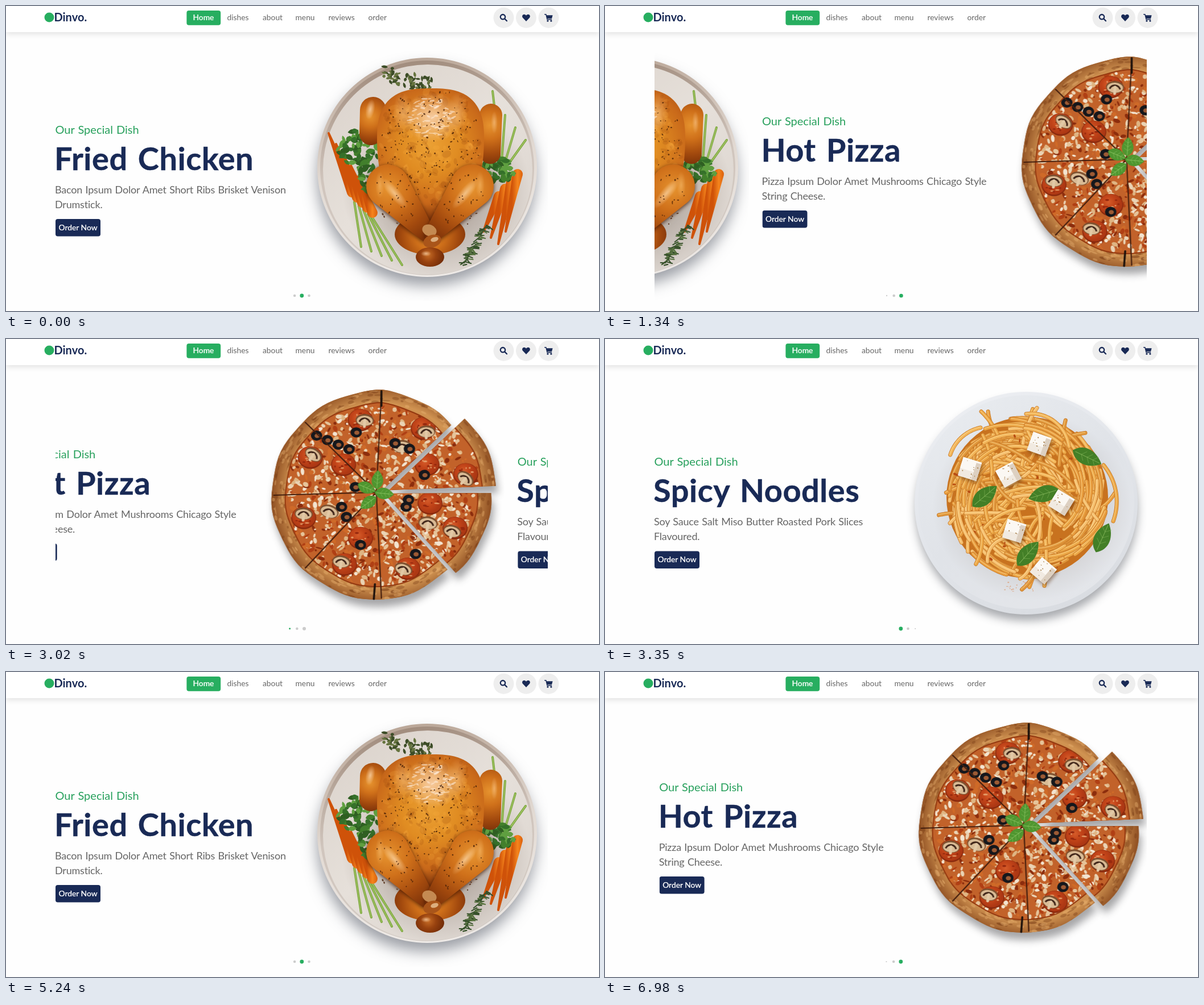
An HTML page with a canvas for the animation above (7050 ms loop, 1042 px wide and 537 px high).

```html
<!DOCTYPE html>
<html lang="en">
<head>
<meta charset="utf-8">
<title>Special dishes</title>
<style>
html, body { margin: 0; width: 100%; height: 100%; overflow: hidden; background: #fefefe; }
#stage { position: relative; width: 1042px; height: 537px; overflow: hidden; }
#stage svg, canvas { position: absolute; left: 0; top: 0; display: block; }
text { font-family: Lato, "Open Sans", sans-serif; font-size: 13.8px; white-space: pre; }
header { position: absolute; left: 0; top: 0; width: 1042px; height: 46px; background: #fff; box-shadow: 0 4px 9px rgba(0,0,0,.1); }
.nav { fill: #666; }
.brand { font-size: 20px; font-weight: 700; fill: #192a56; }
.light { fill: #fff; font-weight: 500; stroke: #fff; stroke-width: .2px; }
#view { position: absolute; left: 87px; top: 80px; width: 865px; height: 440px; overflow: hidden; }
.slide { position: absolute; left: 0; top: 0; width: 865px; height: 440px; }
.sub { font-size: 20px; word-spacing: 1px; fill: #27a05c; }
.title { font-size: 56px; font-weight: 700; letter-spacing: .5px; word-spacing: 4px; fill: #192a56; stroke: #192a56; stroke-width: .4px; stroke-linejoin: round; }
.body { font-size: 18px; letter-spacing: -.2px; word-spacing: 1px; fill: #666; }
</style>
</head>
<body>
<div id="stage">
  <div id="view"></div>
  <header>
    <svg width="1042" height="46">
      <circle cx="76" cy="20" r="8.5" fill="#27ae60"/>
      <text class="brand" x="84.5" y="27">Dinvo.</text>
      <rect x="317.4" y="8" width="59.8" height="25.8" rx="4" fill="#27ae60"/>
      <text class="light" x="328.5" y="25">Home</text>
      <g class="nav">
        <text x="388.5" y="25">dishes</text>
        <text x="451" y="25">about</text>
        <text x="508.5" y="25">menu</text>
        <text x="566.5" y="25">reviews</text>
        <text x="636.5" y="25">order</text>
      </g>
      <g fill="#eee">
        <circle cx="874.5" cy="20.7" r="18"/><circle cx="914" cy="20.7" r="18"/><circle cx="953.5" cy="20.7" r="18"/>
      </g>
      <g fill="none" stroke="#192a56" stroke-width="2.3" stroke-linecap="round">
        <circle cx="873" cy="19.2" r="4.2"/><path d="M876.4 22.6L880 26.2"/>
      </g>
      <g fill="#192a56">
        <path d="M914 27L908.3 21.1C905.6 17.6 908 14.5 910.6 14.7C912.3 14.8 913.3 15.8 914 16.8C914.7 15.8 915.7 14.8 917.4 14.7C920 14.5 922.4 17.6 919.7 21.1Z"/>
        <path d="M949.2 16.2H960.6L959 22.2H950.6Z"/>
        <circle cx="951.9" cy="26.2" r="1.5"/><circle cx="957.9" cy="26.2" r="1.5"/>
      </g>
      <path d="M946.6 14.8H948.9L951 23.8H958.6" fill="none" stroke="#192a56" stroke-width="1.4" stroke-linecap="round"/>
    </svg>
  </header>
  <svg width="1042" height="537"><g id="dots"></g></svg>
</div>
<script>
const { PI, cos, sin, abs, sign, sqrt } = Math, TAU = PI * 2;
let g, seed;

function rnd(a = 0, b = 1) {
  seed = (seed + 0x6D2B79F5) | 0;
  let v = Math.imul(seed ^ seed >>> 15, 1 | seed);
  v = v + Math.imul(v ^ v >>> 7, 61 | v) ^ v;
  return a + (b - a) * ((v ^ v >>> 14) >>> 0) / 4294967296;
}
function repeat(n, draw) { for (let i = 0; i < n; i++) draw(i); }

// Random point in an ellipse, or in its outer ring
function scatter(x, y, rx, ry, inner = 0) {
  const a = rnd(0, TAU), r = sqrt(rnd(inner * inner, 1));
  return [x + cos(a) * r * rx, y + sin(a) * r * ry];
}
function oval(x, y, rx, ry, fill, turn = 0) {
  g.beginPath(); g.ellipse(x, y, rx, ry, turn, 0, TAU);
  g.fillStyle = fill; g.fill();
}
function line(points, color, w) {
  g.beginPath();
  points.forEach(p => g.lineTo(...p));
  g.strokeStyle = color; g.lineWidth = w; g.lineCap = g.lineJoin = "round"; g.stroke();
}
// Outline from a function of the angle
function outline(at) {
  g.beginPath();
  for (let a = 0; a < TAU; a += .04) g.lineTo(...at(a));
  g.closePath();
}
// Hull of two circles
function taper(x1, y1, r1, x2, y2, r2, fill) {
  const a = Math.atan2(y2 - y1, x2 - x1), b = Math.acos((r1 - r2) / Math.hypot(x2 - x1, y2 - y1));
  g.beginPath();
  g.arc(x1, y1, r1, a + b, a - b + TAU);
  g.arc(x2, y2, r2, a - b, a + b);
  g.fillStyle = fill; g.fill();
}
function stops(f, colors) {
  colors.forEach((c, i) => f.addColorStop(i / (colors.length - 1), c));
  return f;
}
const radial = (x, y, r, ...colors) => stops(g.createRadialGradient(x, y, 0, x, y, r), colors);
const linear = (x1, y1, x2, y2, ...colors) => stops(g.createLinearGradient(x1, y1, x2, y2), colors);

function glow(x, y, rx, ry, rgb, alpha, turn = 0) {
  placed(x, y, turn, () => {
    g.scale(rx, ry);
    oval(0, 0, 1, 1, radial(0, 0, 1, `rgba(${rgb},${alpha})`, `rgba(${rgb},0)`));
  });
}
function placed(x, y, turn, draw) {
  g.save(); g.translate(x, y); g.rotate(turn); draw(); g.restore();
}
function shaded(dx, dy, blur, color, draw) {
  g.save();
  g.shadowOffsetX = dx; g.shadowOffsetY = dy; g.shadowBlur = blur; g.shadowColor = color;
  draw();
  g.restore();
}
function leaf(x, y, len, wid, turn, color, rib) {
  placed(x, y, turn, () => {
    g.beginPath(); g.moveTo(-len, 0);
    g.bezierCurveTo(-len * .5, -wid * 1.5, len * .4, -wid * 1.2, len, 0);
    g.bezierCurveTo(len * .4, wid * 1.2, -len * .5, wid * 1.5, -len, 0);
    g.fillStyle = color; g.fill();
    if (!rib) return;
    line([[-len * .8, 0], [len * .85, 0]], rib, 1);
    for (const s of [-.4, 0, .4])
      for (const d of [-1, 1]) line([[len * s, 0], [len * (s + .25), d * wid * .6]], rib, .6);
  });
}
function parsley(x, y, rx, ry, n) {
  repeat(n, i => leaf(...scatter(x, y, rx, ry), rnd(5, 9), rnd(2.5, 5), rnd(0, TAU),
    ["#2f5f22", "#427f2c", "#5f9f40", "#35702a"][i % 4]));
}

function chicken() {
  const mid = 745;
  shaded(-1, 16, 26, "rgba(55,62,75,.5)", () => oval(740, 284, 192, 192, "#ddd"));
  oval(740, 284, 193, 193, linear(690, 91, 760, 477, "#b9a596", "#e2dad3", "#efebe8"));
  oval(740, 285, 188, 189, linear(690, 95, 750, 470, "#a08b7c", "#d0c5bd", "#d4ccc5"));
  oval(741, 288, 184, 185, linear(600, 130, 850, 450, "#dcd4cd", "#e6e0da", "#dcd5cf"));
  glow(755, 320, 165, 155, "80,62,50", .55);

  // Herbs and vegetables
  repeat(75, () => {
    const u = rnd();
    leaf(664 + u * 86, 118 + u * 24 + rnd(-13, 13), rnd(3, 6), rnd(1.5, 2.8), rnd(0, TAU), rnd() < .7 ? "#3d4d27" : "#66743f");
  });
  const stem = (...p) => { line(p, "#7aa63c", 4); line(p, "#a9c96a", 1.3); };
  repeat(5, i => stem([612 + i * 8, 345 + i * 7], [624 + i * 18, 424 + i * 8]));
  repeat(3, i => stem([870 + i * 4, 285], [877 + i * 18, 192 + i * 22]));
  stem([855, 150], [859, 184]);
  const carrot = (x1, y1, x2, y2) =>
    taper(x1, y1, 9, x2, y2, 2, linear(x1 - 10, y1, x1 + 10, y1, "#cf5209", "#f5851d", "#d95c0b"));
  repeat(5, i => carrot(608 + i * 9, 328 + i * 9, 567 + i * 13, 224 + i * 19));
  repeat(4, i => carrot(866 + i * 11, 335 - i * 13, 839 + i * 13, 397 + i % 3 * 11));
  parsley(622, 250, 38, 32, 65);
  parsley(634, 295, 15, 32, 25);
  parsley(866, 288, 28, 24, 45);
  repeat(70, i => {
    const u = rnd(), x = 845 - u * 42, y = 385 + u * 72;
    line([[x, y], [x + (i % 2 ? 1 : -1) * rnd(4, 11), y + rnd(-2, 9)]], i % 3 ? "#37512b" : "#58733f", 2);
  });

  const skin = (x, y, r) => radial(x, y, r, "#e6932f", "#cf701a", "#a34a0e", "#742d08");
  const fleck = (x, y) => oval(x, y, rnd(.7, 2.2), rnd(.6, 1.5), "rgba(70,30,6,.8)", rnd(0, 3));
  taper(645, 183, 23, 641, 225, 20, skin(640, 195, 55));
  taper(852, 192, 20, 851, 260, 18, skin(850, 210, 75));
  glow(640, 182, 8, 18, "255,226,190", .7, .2);
  glow(858, 205, 6, 20, "255,210,160", .5);
  oval(mid, 402, 62, 36, skin(mid, 405, 75));

  g.save();
  outline(a => [
    746 + 94 * sign(cos(a)) * abs(cos(a)) ** .72,
    235 + (sin(a) < 0 ? -90 : 150) * abs(sin(a)) ** (sin(a) < 0 ? .75 : 1)
  ]);
  g.fillStyle = radial(mid, 245, 150, "#eba033", "#e08c22", "#c9691a", "#8a390b");
  g.fill(); g.clip();
  repeat(260, i => oval(...scatter(mid, 260, 95, 125), rnd(2, 9), rnd(2, 6),
    i % 2 ? "rgba(250,180,70,.16)" : "rgba(140,55,8,.16)", rnd(0, 3)));
  glow(748, 196, 52, 44, "250,214,182", .85);
  for (const d of [-1, 1]) glow(mid + d * 48, 188, 17, 36, "255,205,140", .5);
  glow(mid, 385, 60, 36, "105,38,6", .7);
  repeat(90, () => oval(...scatter(747, 197, 42, 36), rnd(2, 6), rnd(.6, 1.6), "rgba(255,238,222,.55)", rnd(-.5, .5)));
  repeat(190, () => fleck(...scatter(mid, 250, 92, 110)));
  g.restore();

  // Legs, mirrored about the middle
  for (const d of [-1, 1]) {
    const x = mid + d * 74;
    shaded(0, 2, 7, "rgba(60,20,0,.8)", () => taper(x, 317, 38, mid + d * 6, 400, 15, skin(x, 322, 115)));
    glow(x - d * 12, 330, 10, 34, "255,225,185", .65, d * .7);
    glow(x + d * 14, 315, 8, 24, "255,205,130", .45);
    repeat(34, () => fleck(x - d * rnd(-14, 46) + rnd(-10, 10), rnd(295, 385)));
  }
  oval(744, 395, 13, 10, "#c48a52", .4);
  oval(749, 414, 16, 11, "#a9551a", -.3);
  oval(753, 411, 7, 4, "#dcae7e", -.3);
  oval(mid, 442, 25, 17, radial(742, 438, 27, "#c76d26", "#98420f", "#742d08"));
  glow(738, 436, 9, 5, "255,220,180", .7);
}

// Point of the pizza at an angle and a share of the radius
const at = (a, r) => [736 + 193 * r * cos(a), 275 + 185 * r * sin(a)];
const deg = d => d * PI / 180;

// Slice outline; pull shortens the radius toward the right
function wedge(a0, a1, k, pull) {
  g.beginPath();
  g.moveTo(736 + 5 * cos((a0 + a1) / 2), 272);
  for (let i = 0; i <= 80; i++) {
    const a = a0 + (a1 - a0) * i / 80;
    g.lineTo(...at(a, k * (1 - pull * Math.max(0, cos(a)) + .006 * sin(a * 11))));
  }
  g.closePath();
}
function topping() {
  const spots = ["#ead3b4", "#dfb583", "#b03f14", "#f3e4d0", "#cf6a28", "#8c2d0d", "#e6c49a"];
  repeat(1300, i => oval(...scatter(736, 275, 166, 159), rnd(1.5, 6.5), rnd(1.2, 4), spots[i % 7], rnd(0, 3)));
  const pepperoni = (x, y, r) => {
    oval(x, y, r, r * .9, "#8a2a0e");
    oval(x, y - 1, r - 1.5, r * .9 - 1.5, radial(x - 4, y - 5, r, "#d65c2a", "#c24419", "#ad3814"));
    repeat(12, i => oval(...scatter(x, y, r * .7, r * .6), rnd(1, 4), rnd(1, 2), i % 2 ? "#e39a66" : "#97290e"));
  };
  const mushroom = (x, y, r) => placed(x, y, rnd(-.7, .7), () => {
    oval(0, 0, r, r * .68, "#7d5130");
    oval(0, 1, r - 2, r * .68 - 2, "#d9bb95");
    g.beginPath(); g.arc(0, r * .4, r * .6, PI * 1.1, PI * 1.9);
    g.strokeStyle = "#40261a"; g.lineWidth = 3; g.stroke();
    line([[0, 0], [0, r * .7]], "#e2c9a6", 5);
  });
  const olive = (x, y) => {
    oval(x, y, 10, 9, "#15171c");
    oval(x + 1, y + .5, 4.5, 3.8, "#9c5a34");
  };
  repeat(4, i => pepperoni(...at(deg(10 + i * 105), .45), 22));
  repeat(8, i => pepperoni(...at(deg(25 + i * 46), .74), 22));
  repeat(8, i => mushroom(...at(deg(28 + i * 46), .73), 16));
  repeat(3, i => mushroom(...at(deg(32 + i * 130), .5), 17));
  repeat(4, i => olive(622 + i * 19, 170 + i * 8));
  repeat(11, i => olive(...at(deg(i * 137 + 10), .25 + i % 4 * .13)));
}
function pizza() {
  const slices = [
    { span: [.867, TAU - .81], pull: .11, move: [0, 0] },
    { span: [-.02, .83], pull: 0, move: [0, 0] },
    { span: [-.775, -.055], pull: 0, move: [9, -6] }
  ];
  const each = draw => slices.forEach(s => placed(...s.move, 0, () => draw(...s.span, s.pull)));
  each((a, b, pull) => shaded(4, 13, 14, "rgba(60,60,65,.45)", () => {
    wedge(a, b, 1, pull); g.fillStyle = "#a9662f"; g.fill();
  }));
  each((a, b, pull) => {
    wedge(a, b, 1, pull);
    g.fillStyle = radial(736, 275, 194, "#c07a3e", "#c07a3e", "#c07a3e", "#c07a3e", "#bb7337", "#d19452", "#8f4f22");
    g.fill(); g.clip();
    seed = 12;
    repeat(320, i => {
      const t = rnd(0, TAU);
      oval(...at(t, rnd(.86, 1)), rnd(2, 8), rnd(1, 3), i % 2 ? "rgba(232,178,112,.4)" : "rgba(115,55,18,.35)", t + PI / 2);
    });
    wedge(a, b, .87, pull);
    g.strokeStyle = "#93370f"; g.lineWidth = 4; g.stroke();
    g.fillStyle = "#c2622a"; g.fill(); g.clip();
    topping();
  });
  for (let d = 90; d <= 270; d += 45) line([at(deg(d), .98), [727, 270]], "#451f0e", 2.2);
  for (const d of [94, 270]) line([at(deg(d), .99), at(deg(d), .85)], "#1d120c", 3.5);
  // Basil: x, y, turn
  for (const [x, y, turn] of [[710, 262, .4], [729, 248, -1.5], [741, 272, .1], [713, 288, 2.5]])
    leaf(x, y, 17, 10, turn, "#4f9630", "#86bf5e");
}

function cube(x, y, turn) {
  placed(x, y, turn, () => {
    shaded(2, 4, 6, "rgba(90,45,10,.5)", () => { g.fillStyle = "#f1eae1"; g.fillRect(-17, -17, 34, 34); });
    g.fillStyle = "#fbf8f3"; g.fillRect(-17, -17, 34, 20);
    g.fillStyle = "#ddd0c1"; g.fillRect(8, -14, 9, 31);
    repeat(9, () => oval(rnd(-14, 14), rnd(-14, 14), rnd(.5, 1.5), rnd(.5, 1.2), "#a9824f"));
  });
}
// A noodle walks from a point, turning a little at each step
function noodle(x, y, heading, bend, steps, color) {
  const p = [];
  repeat(steps, () => {
    p.push([x, y]);
    x += cos(heading) * 5; y += sin(heading) * 5; heading += bend;
  });
  line(p, "#c47626", 7);
  line(p, color, 5.6);
  line(p.map(([a, b]) => [a - .8, b - .8]), "rgba(255,228,165,.45)", 1.6);
}
function noodles() {
  shaded(1, 12, 16, "rgba(50,55,65,.42)", () => oval(740, 289, 195, 195, "#ddd"));
  oval(740, 289, 196, 196, linear(640, 100, 820, 480, "#eceef2", "#e2e5ea", "#d9dce1"));
  oval(740, 287, 190, 188, linear(620, 110, 850, 470, "#e8ebef", "#e0e3e8", "#e4e6ea"));
  glow(750, 295, 175, 165, "125,110,100", .45);
  oval(742, 279, 142, 142, "#c8721f");
  const tones = ["#e0963a", "#eca746", "#f2b458", "#e89c3d", "#f5bd6c"];
  repeat(260, i => {
    const a = rnd(0, TAU), r = sqrt(rnd()) * 142, x = 742 + cos(a) * r, y = 279 + sin(a) * r;
    // Outer noodles follow the rim of the heap
    if (r > 95) noodle(x, y, a + PI / 2 + rnd(0, .3), 5.4 / r, 15, tones[i % 5]);
    else noodle(x, y, rnd(0, TAU), rnd(-.07, .07), 17, tones[i % 5]);
    if (i % 4 == 0) oval(...scatter(742, 279, 135, 135), rnd(1, 4), rnd(1, 2.5), "#b94c12", a);
  });
  noodle(740, 132, -.1, .075, 22, tones[2]);
  noodle(876, 222, .9, .05, 22, tones[1]);
  noodle(660, 156, 2.9, -.07, 16, tones[2]);
  noodle(672, 392, -1.6, .13, 34, tones[4]);
  repeat(22, () => oval(rnd(700, 755), rnd(426, 446), rnd(.6, 2), rnd(.5, 1.3), "rgba(220,130,70,.6)"));

  // Basil and cheese: x, y, turn
  for (const [x, y, turn] of [[847, 208, .45], [667, 277, -.7], [771, 273, 2.85], [743, 378, -.85], [874, 350, -1.15]])
    leaf(x, y, 28, 14, turn, "#437f27", "#7aad52");
  for (const [x, y, turn] of [[763, 185, .35], [641, 229, .3], [709, 239, -.5], [802, 288, .55], [719, 338, .3], [770, 408, .7]])
    cube(x, y, turn);
}

const dishes = [
  [noodles, "Spicy Noodles", "Soy Sauce Salt Miso Butter Roasted Pork Slices", "Flavoured.", -1.5],
  [chicken, "Fried Chicken", "Bacon Ipsum Dolor Amet Short Ribs Brisket Venison", "Drumstick.", 0],
  [pizza, "Hot Pizza", "Pizza Ipsum Dolor Amet Mushrooms Chicago Style", "String Cheese.", -15]
];
const slides = dishes.map(([draw, title, a, b, dy]) => {
  const el = document.createElement("div");
  el.className = "slide";
  el.innerHTML = `<canvas width="865" height="440"></canvas>
    <svg width="865" height="440"><g transform="translate(0 ${dy - 80})">
    <text class="sub" x="-.5" y="224.5">Our Special Dish</text>
    <text class="title" x="-2" y="288.5">${title}</text>
    <text class="body" x="-1" y="329.5">${a}</text>
    <text class="body" x="-1" y="355.5">${b}</text>
    <rect y="375" width="79" height="30.5" rx="4" fill="#192a56"/>
    <text class="light" x="5.5" y="394.8">Order Now</text></g></svg>`;
  document.getElementById("view").append(el);
  g = el.firstChild.getContext("2d");
  g.translate(-87, -80);
  seed = 7;
  draw();
  return el;
});
const dots = dishes.map(() => {
  const c = document.createElementNS("http://www.w3.org/2000/svg", "circle");
  c.setAttribute("cy", 510);
  return document.getElementById("dots").appendChild(c);
});

// The CSS "ease" curve
function ease(x) {
  if (x >= 1) return 1;
  const bez = (s, a, b) => 3 * (1 - s) ** 2 * s * a + 3 * (1 - s) * s * s * b + s ** 3;
  let lo = 0, hi = 1;
  repeat(24, () => {
    const m = (lo + hi) / 2;
    if (bez(m, .25, .25) < x) lo = m; else hi = m;
  });
  return bez(lo, .1, 1);
}

const LOOP = 7050, PITCH = 888.6, STEP = 66;
const order = [1, 2, 0, 1, 2];
// Each move: time of its first step and the progress already made (ms)
const moves = [[1200, 32.8], [3020, 32], [4890, 31.7], [6710, 32]];
const dotSize = d => 3.4 - 1.15 * abs(d);

function show(t) {
  const k = moves.filter(m => m[0] <= t).length;
  const from = order[Math.max(0, k - 1)], to = order[k];
  let past = 1000;
  if (k) {
    const [start, lead] = moves[k - 1];
    past = lead + Math.floor((t - start) / STEP) * STEP;
  }
  const p = ease(past / 340), q = ease(past / 227);
  slides.forEach((el, i) => {
    const x = i === to ? (1 - p) * PITCH : -p * PITCH;
    el.style.visibility = i === to || (i === from && p < 1) ? "visible" : "hidden";
    el.style.transform = `translateX(${x.toFixed(2)}px)`;
  });
  dots.forEach((c, i) => {
    c.setAttribute("cx", 519.8 + (i - from - (to - from) * q) * 12.7);
    c.setAttribute("r", dotSize(i - from) * (1 - q) + dotSize(i - to) * q);
    c.setAttribute("fill", i === to ? "#27ae60" : "#ccc");
  });
}
function tick() {
  show(performance.now() % LOOP);
  requestAnimationFrame(tick);
}
tick();
</script>
</body>
</html>
```
